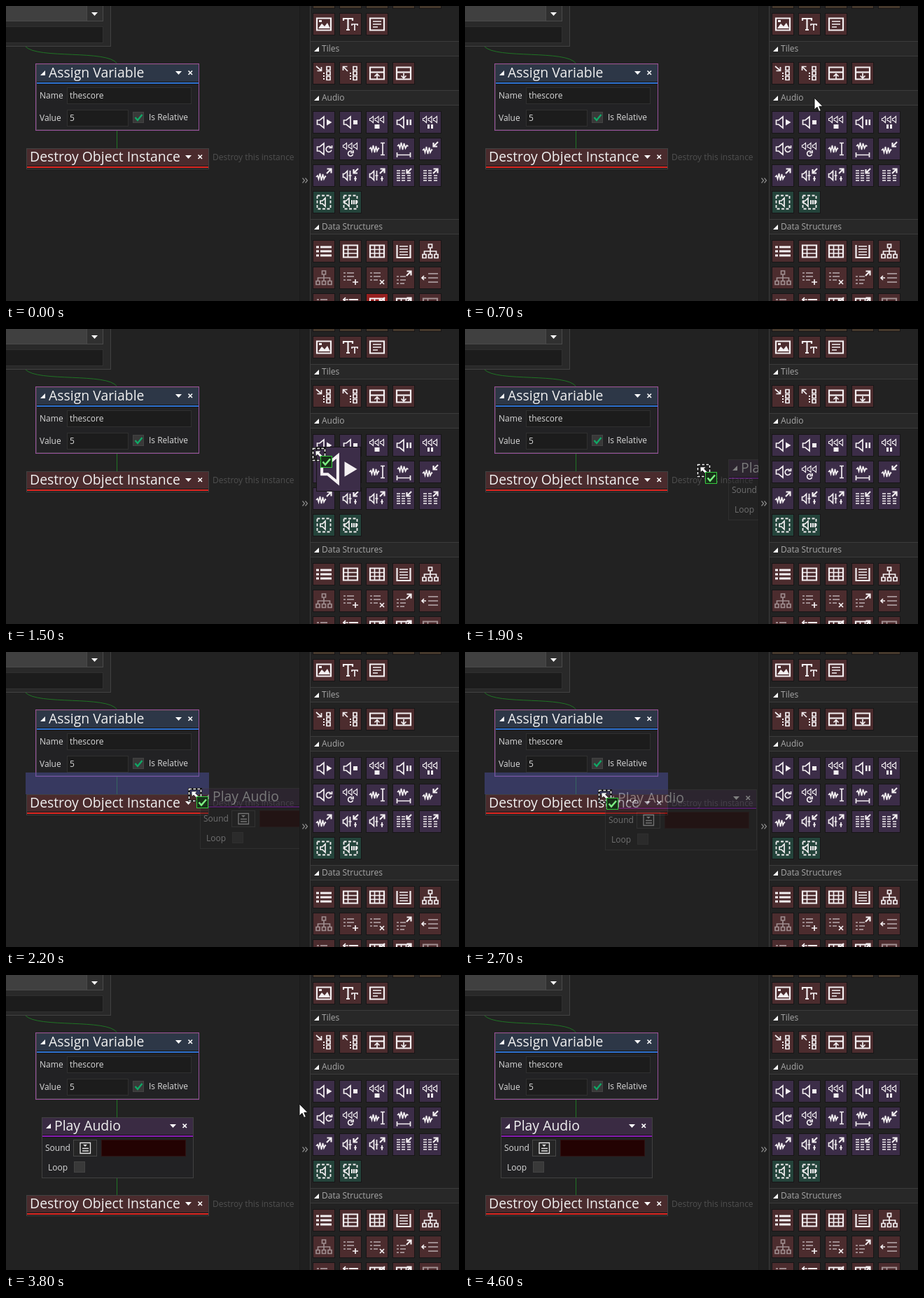
Write an HTML page that moves like this. It is 647 px wide and 421 px high and loops after 4.7 s.

```html
<!DOCTYPE html>
<html lang="en">
<head>
<meta charset="utf-8">
<title>Dragging an action into a script</title>
<style>
  html, body { margin: 0; width: 100%; height: 100%; overflow: hidden; background: #222; }
  svg { display: block; }
  text { font-family: "Open Sans", "Noto Sans", sans-serif; white-space: pre; }
  .icon path { fill: none; stroke: #f4f0f2; stroke-width: 2.2; }
  .icon .thin { stroke-width: 1.7; }
  .icon .fine { stroke-width: 1.1; }
  .icon .bold { stroke-width: 3; }
  .icon .muted { stroke-width: 1.5; opacity: .65; }
  .icon .solid { fill: #f4f0f2; stroke: none; }
  .icon .dash { stroke-dasharray: 4 2.5; stroke-width: 1.8; }
  .dim path { opacity: .5; }
  .red { --c: #4c2c2e; --h: #96201f; }
  .purple { --c: #3c2d48; --h: #69408a; }
  .green { --c: #24443b; --h: #2f7260; }
  .brown { --c: #46392c; --h: #6b5535; }
  .tile { fill: var(--c); stroke: #171517; }
  .hover .tile { fill: var(--h); }
</style>
</head>
<body>
<svg id="stage" width="647" height="421" viewBox="0 0 647 421"></svg>
<script>
const rect = (x, y, w, h, fill, stroke = "none", extra = "") =>
  `<rect x="${x + .5}" y="${y + .5}" width="${w - 1}" height="${h - 1}" fill="${fill}" stroke="${stroke}" ${extra}/>`;
const box = (x, y, w, h, fill) => `<rect x="${x}" y="${y}" width="${w}" height="${h}" fill="${fill}"/>`;
const text = (x, y, s, size = 12, fill = "#dadada") => `<text x="${x}" y="${y}" font-size="${size}" fill="${fill}">${s}</text>`;
const shape = (d, fill = "#fff", extra = "") => `<path d="${d}" fill="${fill}" ${extra}/>`;
const line = (d, stroke, width = 1) => `<path d="${d}" fill="none" stroke="${stroke}" stroke-width="${width}"/>`;

// Action block with title bar, accent line and buttons
function block(x, y, w, h, { title, head, accent, fold = true }) {
  const r = x + w;
  return rect(x, y, w, h, "#222224", "#414141") +
    box(x + 1, y + 1, w - 2, 24, head) +
    box(x + 1, y + 25, w - 2, 4, "#151515") +
    box(x + 1, y + 26, w - 2, 2, accent) +
    (fold ? shape(`M${x + 6} ${y + 16}h7v-7z`) : "") +
    text(x + (fold ? 18 : 5), y + 19, title, 19.4, "#f0f0f0") +
    shape(`M${r - 34} ${y + 10}h9l-4.5 5z`) +
    line(`M${r - 15.5} ${y + 9.5}l5.5 5.5m0-5.5l-5.5 5.5`, "#fff", 1.6);
}

const field = (x, y, w, h) => rect(x, y, w, h, "#1c1c1c", "#303030");
const checkbox = (x, y) => rect(x, y, 16, 16, "#393939", "#434343");

// Icon strokes in a 32 unit tile; the leading letter picks the line style
const kinds = { t: "thin", f: "fine", b: "bold", m: "muted", s: "solid", d: "dash" };
const speaker = "t M6.5 13h3.5l6-5v16l-6-5h-3.5z";
const smallSpeaker = "t M5.5 13.5h2l4-4v13l-4-4h-2z";
const trio = [5.5, 13, 20.5].map(x => `f M${x} 10.5h1.5l3.5-3v9l-3.5-3h-1.5z`).join("|");
const wave = y => `t M5 ${y}l2-2 1.5 5 2-8 2 10 2-9 1.5 7 2-4 1 1`;
const arrowIn = "M27 6l-6 6M20.5 7v5.5h5.5";
const arrowOut = "M20 13l6-6M20.5 6.5h6v6";
const faders = "t " + [9, 12.5, 16, 19.5, 23].map(y => `M6 ${y}h5M13 ${y}h5` + (y > 15 ? `M21 ${y}h5` : "")).join("");
const mixer = smallSpeaker + "|t M15.5 9v14M13.5 16h4M23 17v7M21 20.5h4";
const rows = (x, y) => [0, 6, 12].map(d => `M${x} ${y + d}h${27 - x}`).join("");
const list = "b M5 10h4M5 16h4M5 22h4|b " + rows(11, 10);
const shortList = "m M6 9h3m2 0h10M6 14h3m2 0h10M6 19h3m2 0h6";
const frame = "M6 7.5h20v17h-20z";
const tree = "t M13.5 6h5v5h-5zM16 11v9M7.5 20v-4h17v4M5 20.5h5v5h-5zM13.5 20.5h5v5h-5zM22 20.5h5v5h-5z";
const tileColumn = "t M20 6.5h5v5h-5zM20 13.5h5v5h-5zM20 20.5h5v5h-5z|s M15 15h2v2h-2zM15 19h2v2h-2zM15 23h2v2h-2z";
const corners = "d M6.5 6.5h19v19h-19z";
const play = speaker + "|s M20 11.5l7.5 4.5-7.5 4.5z";
const table = frame + "|t M6 13.5h20M6 19h20M12.5 8v17";
const grid = table + "|t M19.5 8v17";
const note = frame + "|t M10 12h12M10 16h12M10 20h7";

// [color, top, icons]
const groups = [
  ["brown", -28, ["", "", "", "", ""]],
  ["red", 10, [
    frame + "|s M8 22l5-7 4 4 4-5 4 8zM9 10h4v3h-4z",
    "M6 11v-3h13v3M12.5 8v16M10 24h5|t M18 18v-2h8v2M22 16v9",
    note]],
  ["red", 80, [
    "t M5 6l7 6M12.5 7v5.5h-6|" + tileColumn,
    "t M12 13l-6-6M5.5 12v-5.5h6|" + tileColumn,
    frame + "|M6 14.5h20|t M16 24v-6M12.5 20.5l3.5-3.5 3.5 3.5",
    frame + "|M6 14.5h20|t M16 16v7M12.5 19.5l3.5 3.5 3.5-3.5"]],
  ["purple", 150, [
    play,
    speaker + "|s M20 13h6v6h-6z",
    trio + "|s M12.5 19h7v6h-7z",
    speaker + "|s M20 12h2.5v8h-2.5zM24.5 12h2.5v8h-2.5z",
    trio + "|s M12 19h3v6h-3zM17 19h3v6h-3z"]],
  ["purple", 188, [
    speaker + "|t M26 13.5a4 4 0 1 0 1 4M27.5 11v3.5h-4",
    trio + "|t M18.5 20a3.5 3.5 0 1 0 1 3.5M20 18v3.5h-4",
    wave(16) + "|t M21 7.5h6M24 7.5v17M21 24.5h6",
    "t M7 12l2-2 1.5 5 2-8 2 10 2-9 2 7 2-4 2 1|t M6 24.5h20M6.5 21v7M25.5 21v7",
    wave(18) + "|" + arrowIn]],
  ["purple", 226, [
    wave(18) + "|" + arrowOut,
    mixer + "|" + arrowIn,
    mixer + "|" + arrowOut,
    faders + "|" + arrowIn,
    faders + "|" + arrowOut]],
  ["green", 264, [
    corners + "|t M11 14h3l4-4v12l-4-4h-3z",
    corners + "|t M8 14h2l4-4v12l-4-4h-2z|s M17 13h2v6h-2zM20 13h2v6h-2zM23 13h2v6h-2z"]],
  ["red", 334, [
    list, table, grid,
    "M6.5 7v18h19v-18|t M10 9h12M10 13h12M10 17h12M10 21h12",
    tree]],
  ["red", 372, [
    "~" + tree,
    shortList + "|t M23 18v8M19 22h8",
    shortList + "|t M20 19l6 6m0-6l-6 6",
    "m M6 14h3m2 0h8M6 19h3m2 0h8M6 24h3m2 0h6|" + arrowOut,
    "t M4 16h6M7 13l-3 3 3 3|m " + rows(13, 10)]],
  ["red", 410, [
    "~" + shortList,
    "t M5 9h8M9 6l-3 3 3 3|" + rows(14, 9),
    grid + "|" + arrowIn,
    grid + "|" + arrowOut,
    "~" + table]]
];

const strokes = spec => spec.replace("~", "").split("|").filter(Boolean).map(p => {
  const kind = kinds[p[0]];
  return `<path class="${kind || ""}" d="${kind ? p.slice(2) : p}"/>`;
}).join("");

const tiles = [];
const palette = groups.map(([color, y, specs]) => specs.map((spec, i) => {
  const x = 438 + 38 * i;
  tiles.push([x, y]);
  return `<g class="icon ${color} ${spec[0] === "~" ? "dim" : ""}" transform="translate(${x} ${y})">` +
    `<rect class="tile" x=".5" y=".5" width="31" height="31"/>${strokes(spec)}</g>`;
}).join("")).join("");

const section = (y, name) => box(435, y, 212, 22, "#282828") + box(435, y, 212, 1, "#3b3b3b") +
  box(435, y + 21, 212, 1, "#3b3b3b") + shape(`M440 ${y + 15}h7v-7z`) + text(451, y + 15, name, 12, "#a8a8a8");

const link = "#1f7424";
const parent = rect(-10, -20, 160, 78, "#292929", "#424242") +
  rect(-10, -5, 126, 27, "#404040", "#4a4a4a") + rect(115, -5, 24, 27, "#303030", "#4a4a4a") +
  shape("M122 9h9l-4.5 5z") + field(-10, 29, 149, 24) +
  line("M28 58C45 76 145 62 158.5 82", link);

const assign = block(43, 83, 233, 94, { title: "Assign Variable", head: "#2d3747", accent: "#2f73d2" }) +
  rect(42, 82, 234, 96, "none", "#96509a") +
  text(48, 132, "Name") + field(87, 116, 178, 24) + text(91, 132, "thescore") +
  text(48, 164, "Value") + field(87, 148, 88, 24) + text(91, 164, "5") +
  checkbox(181, 151) + line("M184.5 159l3.500 4 6.500-8", "#10a866", 2.4) +
  text(204, 163, "Is Relative");

const playBlock = block(51, 203, 217, 87, { title: "Play Audio", head: "#3a2b43", accent: "#8a1db5" }) +
  text(56, 251, "Sound") + rect(96, 235, 34, 24, "#252525", "#484848") +
  line("M106 239.5h14.5v15h-14.5zM109 247.5h9M109 251h9", "#e4e4e4", 1.3) + shape("M110 242h6l-3 3z", "#e4e4e4") +
  rect(136, 235, 121, 24, "#230202", "#2d1212") +
  text(60, 279, "Loop") + checkbox(97, 266);

const destroy = block(29, 203, 261, 30, { title: "Destroy Object Instance", head: "#4a2b2d", accent: "#e32a25", fold: false }) +
  text(295, 220, "Destroy this instance", 12, "#505050");

const arrow = "M0 0V17L4 13.3L6.6 19.5L9.4 18.3L6.8 12.3H12Z";

document.getElementById("stage").innerHTML = `
  <defs><g id="playBlock">${playBlock}</g></defs>
  ${box(0, 0, 647, 421, "#222")}
  ${parent}
  ${line("M158.5 178V203", link)}
  ${assign}
  <g id="placed">${line("M158.5 290V314", link)}<use href="#playBlock"/></g>
  <g id="zone">${box(28, 172, 262, 31, "rgba(80,85,170,.45)")}</g>
  <g id="destroy">${destroy}</g>
  <g id="ghostBlock" opacity=".42"><use href="#playBlock"/></g>
  ${box(420, 0, 14, 421, "#1f1f1f")}${box(419, 0, 1, 421, "#1a1a1a")}
  ${box(434, 0, 213, 421, "#222")}${box(434, 0, 1, 421, "#3c3c3c")}
  ${line("M423.5 245.5l3 3.5-3 3.5M427.5 245.5l3 3.5-3 3.5", "#8c8c8c", 1.2)}
  ${section(50, "Tiles")}${section(120, "Audio")}${section(304, "Data Structures")}
  ${palette}
  <g id="ghostIcon" class="icon purple">
    <rect class="tile" x=".5" y=".5" width="63" height="63"/>
    <g transform="translate(-7.5 -6.4) scale(2.4)">${strokes(play)}</g>
  </g>
  <g id="dragCursor">
    ${rect(0, 0, 18, 18, "none", "#111", 'stroke-width="3"')}
    ${rect(0, 0, 18, 18, "none", "#fff", 'stroke-width="1.5" stroke-dasharray="3.5 2.5"')}
    ${shape("M4 4h8l-2.5 2.5 5 5-2.5 2.5-5-5-2.5 2.5z", "#fff", 'stroke="#111" stroke-width=".6"')}
    ${rect(11, 11, 17, 17, "#173018", "#32c83c")}
    ${line("M14.5 19.5l3.5 4 7-8", "#7df083", 2.5)}
  </g>
  <g id="cursor">${shape(arrow, "#fff", 'stroke="#111"')}</g>`;

// Pointer path: [step, x, y], one step is 100 ms
const path = [
  [0, 538, 424], [1, 546, 398], [2, 574, 340], [3, 608, 250], [4, 628, 160], [5, 604, 102],
  [6, 507, 126], [7, 499, 131], [8, 476, 150], [9, 458, 162], [12, 454, 165], [13, 447, 168],
  [14, 441, 169], [15, 438, 170], [16, 432, 172], [17, 408, 179], [18, 374, 187], [19, 332, 193],
  [20, 295, 195], [21, 275, 195], [22, 261, 195], [26, 198, 197], [27, 191, 197], [30, 167, 198],
  [33, 168, 198], [36, 176, 196], [37, 302, 182], [38, 419, 184], [39, 520, 205], [40, 605, 265],
  [41, 630, 335], [42, 627, 379], [44, 629, 398], [45, 630, 410], [46, 631, 440]
];
const STEP = 100, STEPS = 47, GRAB = 13, DROP = 33;

function pointer(n) {
  const i = path.findIndex(p => p[0] >= n);
  const b = path[i], a = path[Math.max(0, i - 1)];
  const k = b === a ? 0 : (n - a[0]) / (b[0] - a[0]);
  return [1, 2].map(j => Math.round(a[j] + (b[j] - a[j]) * k));
}

const el = id => document.getElementById(id);
const show = (id, on) => el(id).style.display = on ? "" : "none";
const move = (id, x, y) => el(id).setAttribute("transform", `translate(${x} ${y})`);
const iconNodes = [...document.querySelectorAll(".icon:not(#ghostIcon)")];

function draw(n) {
  const [x, y] = pointer(n);
  const dragging = n >= GRAB && n < DROP, dropped = n >= DROP;
  const inWorkspace = x < 420;
  // The dragged copy trails the pointer by one step
  const [px, py] = pointer(Math.max(0, n - 1));

  show("cursor", !dragging);
  show("dragCursor", dragging);
  show("ghostIcon", dragging && !inWorkspace);
  show("ghostBlock", dragging && inWorkspace);
  show("zone", dragging && x < 290);
  show("placed", dropped);
  move("cursor", x, y);
  move("dragCursor", x, y);
  move("ghostIcon", px + 2, py - 1);
  move("ghostBlock", px + 2 - 51, py - 1 - 203);
  move("destroy", 0, dropped ? 111 : 0);
  iconNodes.forEach((node, i) => {
    const [tx, ty] = tiles[i];
    node.classList.toggle("hover", !dragging && x >= tx && x < tx + 32 && y >= ty && y < ty + 32);
  });
}

const start = performance.now();
let shown = -1;
function tick() {
  const n = Math.floor((performance.now() - start) / STEP) % STEPS;
  if (n !== shown) draw(shown = n);
  requestAnimationFrame(tick);
}
tick();
</script>
</body>
</html>
```
